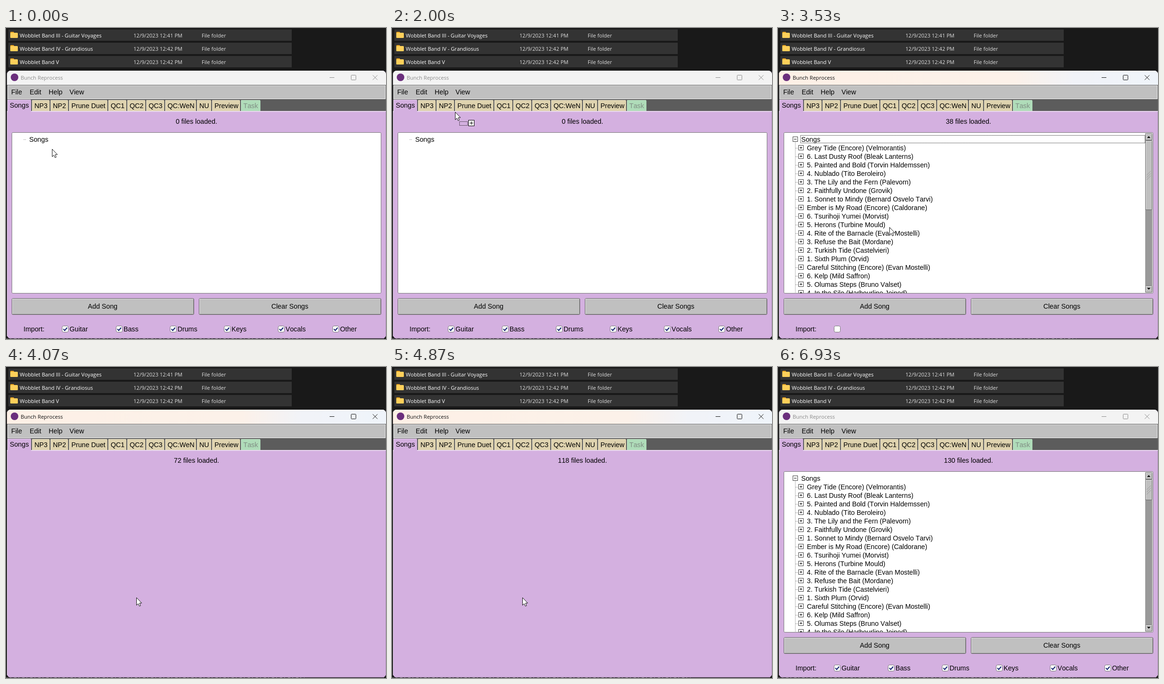
Recreate the animation shown at these times as an HTML page with a canvas. Size 802 by 656 pixels, loop 7000 ms.

```html
<!DOCTYPE html>
<html lang="en">
<head>
<meta charset="utf-8">
<title>Batch song import</title>
<style>
  html, body { margin: 0; width: 802px; height: 656px; overflow: hidden; background: #191919; }
  canvas { display: block; }
</style>
</head>
<body>
<canvas id="stage" width="802" height="656"></canvas>
<script>
const ctx = document.getElementById('stage').getContext('2d');
const LOOP = 7000, TICK = 200 / 3;
const SYSTEM = '11.1px "Open Sans", sans-serif';
const APP = '14.2px "Liberation Sans", Arial, sans-serif';
const LILAC = '#d4b0e0', GREY = '#c0c0c0';
ctx.fontKerning = 'none';

const folders = [
  ['Wobblet Band III - Guitar Voyages', '12/9/2023 12:41 PM'],
  ['Wobblet Band IV - Grandiosus', '12/9/2023 12:42 PM'],
  ['Wobblet Band V', '12/9/2023 12:42 PM']
];
const tabs = [
  ['NP3', 55, 92], ['NP2', 94, 131], ['Prune Duet', 133, 214], ['QC1', 216, 254],
  ['QC2', 256, 294], ['QC3', 296, 334], ['QC:WeN', 336, 401], ['NU', 403, 433],
  ['Preview', 435, 494], ['Task', 496, 537]
];
const songs = [
  'Grey Tide (Encore) (Velmorantis)',
  '6. Last Dusty Roof (Bleak Lanterns)',
  '5. Painted and Bold (Torvin Haldemssen)',
  '4. Nublado (Tito Beroleiro)',
  '3. The Lily and the Fern (Palevorn)',
  '2. Faithfully Undone (Grovik)',
  '1. Sonnet to Mindy (Bernard Osvelo Tarvi)',
  'Ember is My Road (Encore) (Caldorane)',
  '6. Tsurihoji Yumei (Morvist)',
  '5. Herons (Turbine Mould)',
  '4. Rite of the Barnacle (Evan Mostelli)',
  '3. Refuse the Bait (Mordane)',
  '2. Turkish Tide (Castelvieri)',
  '1. Sixth Plum (Orvid)',
  'Careful Stitching (Encore) (Evan Mostelli)',
  '6. Kelp (Mild Saffron)',
  '5. Olumas Steps (Bruno Valset)',
  '4. In the Silo (Harbourline Joined)'
];
const imports = ['Guitar', 'Bass', 'Drums', 'Keys', 'Vocals', 'Other'];

// Keys are [tick, ...values]
const pointerPath = [
  [0, 97, 255], [1, 84, 223], [2, 78, 237], [6, 78, 237], [12, 66, 125], [16, 60, 48],
  [17, 62, 36], [19, 66, 20], [23, 66, 20], [34, 172, 267], [38, 172, 318], [45, 172, 318],
  [53, 235, 420], [57, 275, 486], [91, 275, 486], [95, 193, 632]
];
const countKeys = [[41, 0], [45, 9], [53, 38], [67, 97], [73, 118], [78, 130]];

function sample(keys, tick) {
  const next = keys.findIndex(key => key[0] >= tick);
  if (next < 0) return keys[keys.length - 1].slice(1);
  if (next === 0) return keys[0].slice(1);
  const a = keys[next - 1], b = keys[next], f = (tick - a[0]) / (b[0] - a[0]);
  return a.slice(1).map((v, i) => Math.round(v + (b[i + 1] - v) * f));
}

function rect(x, y, w, h, color) {
  ctx.fillStyle = color;
  ctx.fillRect(x, y, w, h);
}
function frame(x, y, w, h, color) {
  ctx.strokeStyle = color;
  ctx.strokeRect(x + .5, y + .5, w - 1, h - 1);
}
function rounded(x, y, w, h, r, fill, stroke) {
  ctx.beginPath();
  ctx.roundRect(x, y, w, h, r);
  ctx.fillStyle = fill;
  ctx.fill();
  if (stroke) { ctx.strokeStyle = stroke; ctx.stroke(); }
}
function line(points, color, dash = []) {
  ctx.beginPath();
  points.forEach(([x, y]) => ctx.lineTo(x, y));
  ctx.setLineDash(dash);
  ctx.strokeStyle = color;
  ctx.stroke();
  ctx.setLineDash([]);
}
function text(str, x, y, font = APP, color = '#000', align = 'left') {
  ctx.font = font;
  ctx.textAlign = align;
  ctx.fillStyle = color;
  ctx.fillText(str, x, y);
}

function drawFolders(hoverY) {
  folders.forEach(([name, date], i) => {
    const y = 3 + i * 28;
    const hover = hoverY >= y - 2 && hoverY < y + 26;
    rect(5, y, 598, 24, hover ? '#4d4d4d' : '#333');
    if (hover) frame(5, y, 598, 24, '#c8c8c8');
    rounded(9, y + 5, 8, 6, 1.5, '#e5a01f');
    rounded(9, y + 7, 16, 11, 1.5, '#ffd05a');
    text(name, 29, y + 17, SYSTEM, '#fff');
    text(date, 269, y + 17, SYSTEM, '#dedede');
    text('File folder', 413, y + 17, SYSTEM, '#dedede');
  });
}

function drawTitle(background, color) {
  rounded(2, 90, 800, 40, [8, 8, 0, 0], background);
  ctx.beginPath();
  ctx.arc(18, 104, 8, 0, 7);
  ctx.fillStyle = '#6b2f7d';
  ctx.fill();
  text('Bunch Reprocess', 31, 109, SYSTEM, color);
  line([[683, 104.5], [693, 104.5]], color);
  ctx.beginPath();
  ctx.roundRect(728.5, 99.5, 10, 10, 1);
  ctx.stroke();
  line([[774, 99.5], [784, 109.5]], color);
  line([[784, 99.5], [774, 109.5]], color);
}

function drawWindow(active) {
  rounded(2, 90, 800, 565, 8, LILAC);
  drawTitle('#f3f3f3', '#8b8b8b');
  if (active) {
    const warm = ctx.createLinearGradient(2, 0, 802, 0);
    warm.addColorStop(0, '#fdf0e6');
    warm.addColorStop(.62, '#fcf1e9');
    warm.addColorStop(.78, '#f1f3f8');
    warm.addColorStop(1, '#eff4fa');
    ctx.globalAlpha = active;
    drawTitle(warm, '#111');
    ctx.globalAlpha = 1;
  }
  rect(2, 120, 800, 56, '#5c5c5c');
  rect(3, 121, 798, 29, GREY);
  line([[3.5, 149], [3.5, 121.5], [800, 121.5]], '#e2e2e2');
  line([[3, 149.5], [800.5, 149.5], [800.5, 121]], '#f4f4f4');
  [['File', 11], ['Edit', 50], ['Help', 90], ['View', 134]].forEach(([s, x]) => text(s, x, 140));

  tabs.forEach(([label, left, right]) => {
    const off = label === 'Task';
    rounded(left, 152, right - left, 24, [2, 2, 0, 0], off ? '#afdcb9' : '#dfd3af');
    line([[left + .5, 175], [left + .5, 152.5], [right - 1, 152.5]], off ? '#c9ecd0' : '#f0e8cf');
    text(label, left + 5, 169, APP, off ? '#7f8d83' : '#000');
  });
  rect(2, 175, 800, 5, LILAC);
  rect(2, 175, 800, 2, '#e9d6f0');
  rounded(3, 151, 50, 28, [2, 2, 0, 0], LILAC);
  line([[3.5, 178], [3.5, 151.5], [52, 151.5]], '#e9d6f0');
  text('Songs', 8, 168);
  line([[2.5, 176], [2.5, 650]], '#e9d6f0');
  line([[801.5, 176], [801.5, 650]], '#a98cb3');
  line([[6, 654.5], [798, 654.5]], '#8e7597');
  line([[0, 655.5], [630, 655.5]], '#777', [5, 4, 2, 6]);
}

function treeBox(x, y, plus) {
  rect(x, y, 11, 11, '#fff');
  frame(x, y, 11, 11, '#444');
  rect(x + 3, y + 5, 5, 1, '#000');
  if (plus) rect(x + 5, y + 3, 1, 5, '#000');
}

function drawScrollbar(count) {
  const height = Math.round(306 * 18.6 / (count + 1)) + 1, mid = 237 + height / 2;
  rect(775, 222, 15, 336, '#999');
  [[222, 15], [237, height], [543, 15]].forEach(([y, h]) => {
    rounded(775.5, y + .5, 14, h - 1, 2, GREY, '#666');
    line([[776.5, y + h - 2], [776.5, y + 1.5], [789, y + 1.5]], '#e0e0e0');
  });
  [[228, 1], [552, -1]].forEach(([y, dir]) => {
    ctx.beginPath();
    ctx.moveTo(782.5, y);
    ctx.lineTo(786, y + 4 * dir);
    ctx.lineTo(779, y + 4 * dir);
    ctx.fillStyle = '#000';
    ctx.fill();
  });
  for (let d = -4; d <= 6; d += 5) line([[778, mid + d + 4], [787, mid + d - 5]], '#999');
}

function drawList(count, focused) {
  rounded(12.5, 220.5, 779, 339, 2, '#fff', '#777');
  ctx.save();
  ctx.beginPath();
  ctx.rect(13, 221, 778, 338);
  ctx.clip();
  text('Songs', 49, 240);
  if (!count) line([[37, 235.5], [43, 235.5]], '#888', [1, 1]);
  else {
    const shown = songs.slice(0, count), right = count > 18 ? 775 : 790;
    line([[36.5, 241], [36.5, 235 + shown.length * 18]], '#777', [1, 1]);
    treeBox(31, 229);
    shown.forEach((song, i) => {
      const y = 253 + i * 18;
      line([[37, y + .5], [43, y + .5]], '#777', [1, 1]);
      treeBox(43, y - 6, true);
      text(song, 61, y + 5);
    });
    if (focused) {
      ctx.setLineDash([1, 1]);
      frame(47, 226, right - 47, 17, '#000');
      ctx.setLineDash([]);
    }
    if (count > 18) drawScrollbar(count);
  }
  ctx.restore();
}

function drawButton(x, label) {
  rounded(x + .5, 570.5, 384, 34, 2, GREY, '#5e5e5e');
  line([[x + 1.5, 603], [x + 1.5, 571.5], [x + 383, 571.5]], '#e6e6e6');
  line([[x + 2, 603.5], [x + 383.5, 603.5], [x + 383.5, 572]], '#989898');
  text(label, x + 192, 592, APP, '#000', 'center');
}

function drawImports(complete) {
  text('Import:', 37, 640);
  imports.slice(0, complete ? 6 : 1).forEach((label, i) => {
    const x = Math.floor(118 + i * 114.2);
    rounded(x + .5, 628.5, 13, 13, 3, '#fff', '#777');
    if (!complete) return;
    ctx.lineWidth = 2;
    line([[x + 3, 635], [x + 6, 638], [x + 11, 632]], '#10206e');
    ctx.lineWidth = 1;
    text(label, x + 16, 640);
  });
}

function drawPointer(x, y, dragging) {
  ctx.save();
  ctx.translate(x, y);
  if (dragging) {
    ctx.setLineDash([1, 1]);
    frame(9, 20, 18, 9, '#000');
    ctx.setLineDash([]);
    rect(28, 17, 13, 13, '#fff');
    frame(28, 17, 13, 13, '#000');
    rect(31, 23, 7, 1, '#000');
    rect(34, 20, 1, 7, '#000');
  }
  ctx.beginPath();
  [[.5, .5], [.5, 16.5], [4, 13.2], [6.5, 18.5], [9, 17.4], [6.8, 12], [11.5, 12]]
    .forEach(([px, py]) => ctx.lineTo(px, py));
  ctx.closePath();
  ctx.fillStyle = '#fff';
  ctx.fill();
  ctx.strokeStyle = '#111';
  ctx.stroke();
  ctx.restore();
}

function draw(time) {
  const tick = Math.floor((time % LOOP + 4) / TICK) % 105;
  const [x, y] = sample(pointerPath, tick);
  const count = sample(countKeys, tick)[0];
  const active = tick === 42 || tick === 103 ? .5 : tick > 42 && tick < 103 ? 1 : 0;
  // While loading, the panel cycles through complete, cleared and half painted
  const loading = tick >= 42 && tick < 78;
  const painted = loading ? [2, 0, 1][tick % 3] : 2;

  rect(0, 0, 802, 656, '#191919');
  drawFolders(tick < 42 ? y : -99);
  drawWindow(active);
  text(count + ' files loaded.', 402, 202, APP, '#000', 'center');
  if (painted) {
    drawList(count, active > 0);
    drawButton(12, 'Add Song');
    drawButton(407, 'Clear Songs');
    drawImports(painted === 2);
  }
  if (tick < 96) drawPointer(x, y, tick >= 26 && tick < 42);
}

const start = performance.now();
function loop() {
  draw(performance.now() - start);
  requestAnimationFrame(loop);
}
loop();
</script>
</body>
</html>
```
